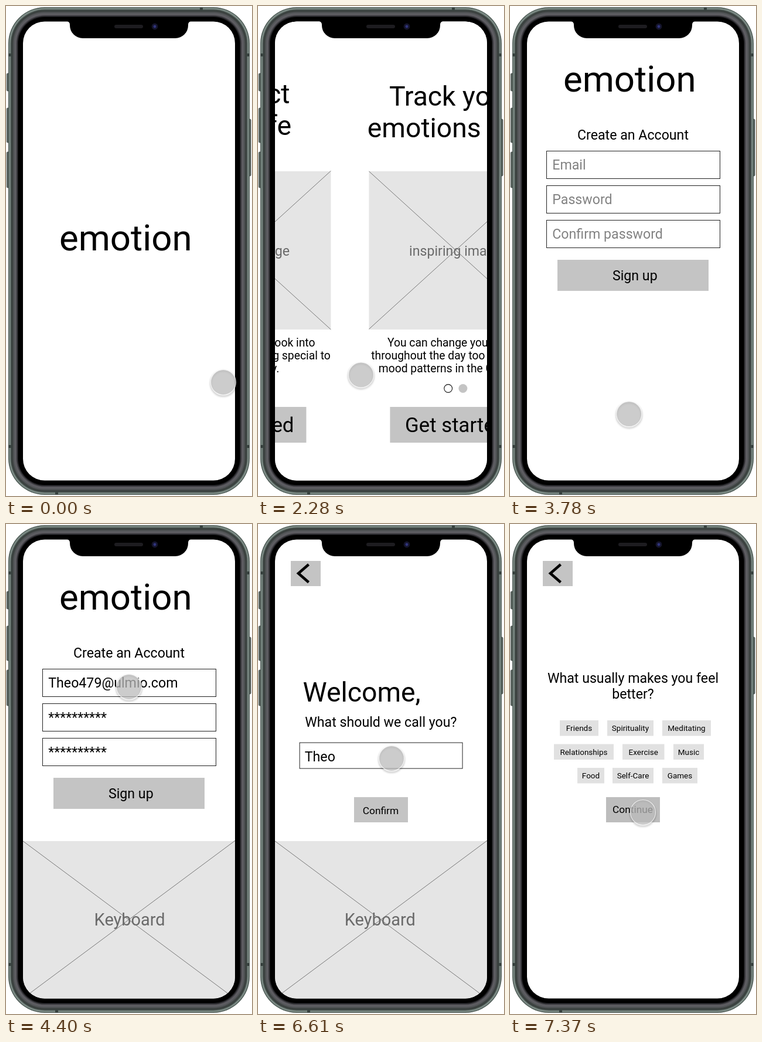
Write an HTML page that moves like this. It is 420x836 px and loops after 8 s.

```html
<!DOCTYPE html>
<html lang="en">
<head>
<meta charset="utf-8">
<title>Mood app prototype</title>
<style>
html, body { margin: 0; width: 100%; height: 100%; overflow: hidden; background: #fff; }
svg { display: block; width: 100%; height: 100%; }
text { font-family: Roboto, Arial, sans-serif; white-space: pre; }
</style>
</head>
<body>
<svg id="stage" viewBox="0 0 420 836"></svg>
<script>
const LOOP = 8000;
const SCALE = 362 / 375; // screen width over design width
const GREY = '#c4c4c4', PALE = '#e5e5e5', HINT = '#828282', DIM = '#6a6a6a';

const box = (x, y, w, h, fill, extra = '') =>
  `<rect x="${x}" y="${y}" width="${w}" height="${h}" fill="${fill}" ${extra}/>`;
const text = (x, y, size, str, fill = '#000', anchor = 'start') =>
  `<text x="${x}" y="${y}" font-size="${(size * SCALE).toFixed(2)}" fill="${fill}" text-anchor="${anchor}">${str}</text>`;
const mid = (x, y, size, str, fill) => text(x, y, size, str, fill, 'middle');
const field = (x, y, w, h) => box(x + .5, y + .5, w, h, '#fff', 'stroke="#222"');
const group = (id, body) => `<g id="${id}">${body}</g>`;

function crossed(x, y, w, h) {
  return box(x, y, w, h, PALE) +
    `<path d="M${x} ${y}l${w} ${h}M${x + w} ${y - .7}l${-w} ${h}" stroke="#777" fill="none"/>`;
}

function dots(active) {
  return [197.3, 222.5].map((x, i) => i === active
    ? `<circle cx="${x}" cy="652.5" r="7.5" fill="${GREY}"/>`
    : `<circle cx="${x}" cy="652.5" r="6.9" fill="#fff" stroke="#111" stroke-width="1.1"/>`).join('');
}

function slide(id, title, lines, active) {
  return group(id, box(29, 26, 362, 784, '#fff') + title +
    crossed(62, 282, 297, 270) + text(130.7, 426, 24, 'inspiring image', DIM) +
    lines.map((s, i) => mid(210, 581 + i * 22.2, 20, s)).join('') +
    dots(active) + box(98, 684, 219, 61, GREY) + text(123.7, 727, 36, 'Get started'));
}

function login(id, values, fill, keys = '') {
  return group(id, mid(204.3, 145.7, 64, 'emotion') + mid(210, 228, 24, 'Create an Account') +
    values.map((s, i) => field(62, 247 + i * 59, 296, 47) + text(72.3, 279 + i * 59, 24, s, fill)).join('') +
    box(81, 433, 258, 53, GREY) + mid(213.3, 468, 24, 'Sign up') + keys);
}

const keyboard = x => crossed(29, 541, 362, 269) + text(x, 685, 30, 'Keyboard', DIM);
const back = box(56, 63, 51, 43, GREY) +
  '<path d="M86.5 69L69 84.2L86.5 99.5" fill="none" stroke="#000" stroke-width="4.6"/>';

function welcome(id, name, fill, cx, cy, keys = '') {
  return group(id, back + text(76.5, 303, 48, 'Welcome,') +
    text(80.3, 346, 24, 'What should we call you?') +
    field(70.6, 372.6, 278, 44) + text(79.8, 405, 24, name, fill) +
    box(164, 466, 92, 43, GREY) + text(cx, cy, 18, 'Confirm') + keys);
}

const tag = (x, y, w, str) => box(x, y, w, 26.5, '#e1e1e1') + mid(x + w / 2, y + 18.3, 14, str);

const screens =
  group('splash', mid(204.3, 417, 64, 'emotion')) +
  group('intro',
    slide('first', text(119.3, 166, 48, 'Redirect') + text(128.2, 220, 48, 'your life'),
      ['Try something new, look into', 'yourself. Add something special to', 'your everyday.'], 0) +
    slide('second', text(96.5, 170, 48, 'Track your') + mid(210, 224, 48, 'emotions daily'),
      ['You can change your mood', 'throughout the day too &amp; see your', 'mood patterns in the Calendar.'], 1)) +
  login('signup', ['Email', 'Password', 'Confirm password'], HINT) +
  login('filled', ['Theo479@ulmio.com', '**********', '**********'], '#000', keyboard(150.6)) +
  welcome('hello', 'Your name', HINT, 179.6, 493) +
  welcome('named', 'Theo', '#000', 178.7, 495, keyboard(147.8)) +
  group('better', back + mid(210, 271, 24, 'What usually makes you feel') + mid(210, 298, 24, 'better?') +
    tag(85, 335, 66, 'Friends') + tag(166, 335, 79, 'Spirituality') + tag(260, 335, 83, 'Meditating') +
    tag(75, 375.5, 102, 'Relationships') + tag(192, 375.5, 71.5, 'Exercise') + tag(279, 375.5, 52, 'Music') +
    tag(115, 416, 46, 'Food') + tag(175, 416, 70, 'Self-Care') + tag(260, 416, 60, 'Games') +
    box(164, 466, 92, 43, '#bdbdbd') + text(175, 493, 18, 'Continue'));

// Phone body: nested rounded rects from the metal rim to the black bezel
const rim = [[0, '#4a5752'], [1.5, '#84938d'], [3, '#6a7772'], [4.5, '#39413e'], [6.5, '#3f4443'],
  [8.5, '#55575a'], [11, '#605f64'], [13, '#504f54'], [14.5, '#303034'], [16, '#121214'], [17, '#000']];
const metal = (x, y, w, h) => box(x, y, w, h, '#5b6661', 'rx="1.5" stroke="#333b38" stroke-width=".8"');
const seam = (x, y, w, h) => box(x, y, w, h, '#38423f');
const phone =
  metal(1.4, 115, 5, 30) + metal(1.4, 174, 5, 59) + metal(1.4, 249, 5, 61) + metal(413, 193, 5, 97) +
  rim.map(([d, c]) => box(4 + d, 2 + d, 412 - 2 * d, 832 - 2 * d, c, `rx="${62 - d}"`)).join('') +
  seam(4, 81, 6, 5) + seam(410, 81, 6, 5) + seam(4, 749, 6, 5) + seam(410, 749, 6, 5) +
  seam(331, 2, 5, 6) + seam(84, 828, 5, 6);
const notch =
  '<path d="M102 25.5Q109 26 109 32V33A22 22 0 0 0 131 55H289A22 22 0 0 0 311 33V32Q311 26 318 25.5Z"/>' +
  box(185, 32, 49, 6, '#1d1c20', 'rx="3"') +
  '<circle cx="254" cy="35" r="5.4" fill="#15152c"/><circle cx="254" cy="35" r="2.4" fill="#30347c"/>';

const stage = document.getElementById('stage');
stage.innerHTML =
  `<defs><clipPath id="glass">${box(29, 26.5, 362, 783, '#fff', 'rx="37"')}</clipPath>
  <filter id="soft" x="-50%" y="-50%" width="200%" height="200%"><feGaussianBlur stdDeviation="1.8"/></filter></defs>` +
  phone + `<g clip-path="url(#glass)">${box(29, 26, 362, 784, '#fff')}${screens}</g>` + notch +
  `<g id="cursor"><circle cy="2" r="21.5" fill="none" stroke="#000" stroke-opacity=".28" stroke-width="2" filter="url(#soft)"/>
  <circle r="21.5" fill="#bbb" fill-opacity=".75" stroke="#fff" stroke-opacity=".75" stroke-width="1.2"/></g>`;

const $ = id => document.getElementById(id);
const cuts = [[0, 'splash'], [920, 'intro'], [3180, 'signup'], [4400, 'filled'],
  [5230, 'hello'], [6610, 'named'], [7370, 'better']];
const bursts = [[1810, 2570, 11], [2650, 3180, 8], [3710, 4400, 10], [4700, 5230, 8],
  [5690, 5690, 1], [5920, 6230, 5], [6530, 6610, 2], [6910, 7370, 7]];
// Cursor stops: time, x, y
const path = [[0, 371, 642], [1735, 371, 642], [1810, 366, 637], [2420, 140, 628], [2570, 132, 630],
  [2870, 195, 698], [3030, 203, 712], [3640, 203, 712], [4250, 210, 278], [4640, 210, 278],
  [5150, 244, 460], [5600, 244, 460], [5690, 243, 459], [5850, 243, 459], [6230, 228, 400],
  [6840, 228, 400], [7290, 227, 492], [LOOP, 227, 492]];

const ease = p => p * p * (3 - 2 * p);
const clamp = p => Math.max(0, Math.min(1, p));

function stepped(t) {
  let time = 0;
  for (const [start, end, n] of bursts) {
    if (t < start) break;
    const gap = (end - start) / Math.max(1, n - 1);
    time = t >= end ? end : start + Math.floor((t - start) / gap) * gap;
  }
  return time;
}

function cursorAt(t) {
  const i = Math.max(1, path.findIndex(k => k[0] >= t));
  const [a, b] = [path[i - 1], path[i]];
  const p = ease(clamp((t - a[0]) / (b[0] - a[0])));
  return [a[1] + (b[1] - a[1]) * p, a[2] + (b[2] - a[2]) * p];
}

function draw(t) {
  const q = stepped(t);
  const shown = cuts.filter(c => c[0] <= t).pop()[1];
  for (const [, id] of cuts) $(id).style.display = id === shown ? '' : 'none';
  const shift = 362 * ease(clamp((q - 1810) / 760));
  $('first').setAttribute('transform', `translate(${-shift} 0)`);
  $('second').setAttribute('transform', `translate(${362 - shift} 0)`);
  $('cursor').setAttribute('transform', `translate(${cursorAt(q).join(' ')})`);
}

const begin = performance.now();
function tick() {
  draw((performance.now() - begin) % LOOP);
  requestAnimationFrame(tick);
}
tick();
</script>
</body>
</html>
```
